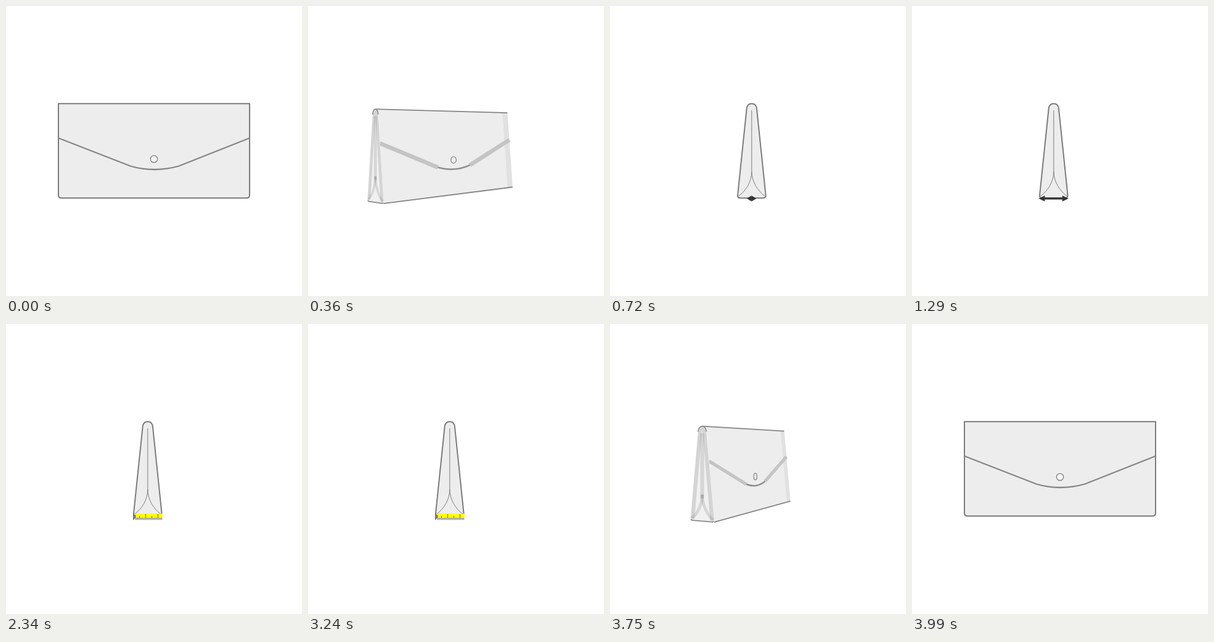
Recreate the animation shown at these times as an HTML page with a canvas. Size 480 by 470 pixels, loop 4080 ms.

```html
<!DOCTYPE html>
<html lang="en">
<head>
<meta charset="utf-8">
<title>Document wallet depth</title>
<style>
html, body { margin: 0; width: 100%; height: 100%; overflow: hidden; background: #fff; }
canvas { display: block; }
</style>
</head>
<body>
<canvas id="stage" width="480" height="470"></canvas>
<script>
const g = document.getElementById('stage').getContext('2d');
const LOOP = 4080, STEP = 30;
const FILL = '#ededed', LINE = '#7b7b7b', PALE = '#d4d4d4';

const clamp = x => Math.max(0, Math.min(1, x));
const span = (t, from, to) => clamp((t - from) / (to - from));
const easeOut = p => 1 - (1 - p) ** 2;

function stroke(path, color, width) {
  g.strokeStyle = color;
  g.lineWidth = width;
  g.stroke(path);
}

function paint(path, width) {
  g.fillStyle = FILL;
  g.fill(path);
  stroke(path, LINE, width);
}

function poly(points, closed) {
  const path = new Path2D();
  points.forEach(p => path.lineTo(p[0], p[1]));
  if (closed) path.closePath();
  return path;
}

function inside(shape, draw) {
  g.save();
  g.clip(shape);
  draw();
  g.restore();
}

const front = new Path2D('M85 158.3H395V306Q395 311.3 390 311.3H90Q85 311.3 85 306Z');
const flap = new Path2D('M85 214L202 259.5Q240 270.5 280 259.5L395 214');
const side = new Path2D('M207 307L221.6 167C222 161.500 225 158.300 229.800 158.300' +
  'S237.600 161.500 238 167L252.500 306Q253 311.300 248.500 311.300H211Q206.500 311.300 207 307Z');
const folds = new Path2D('M229.800 169V268C229.800 285 220 300 208.500 308M229.800 268C229.800 285 240 300 251 308');

function drawFront() {
  paint(front, 2);
  stroke(flap, '#858585', 2.3);
  const button = new Path2D();
  button.arc(240, 248, 5.7, 0, 7);
  g.fillStyle = '#f3f3f3';
  g.fill(button);
  stroke(button, LINE, 1.2);
}

function drawSide() {
  paint(side, 2);
  stroke(folds, LINE, 1);
}

// u runs along the width, v down the height, w through the depth
function projector(angle, lift) {
  const a = angle * Math.PI / 180, c = Math.cos(a), s = Math.sin(a), bulge = Math.sin(2 * a);
  const near = 85 + 167.5 * (angle / 90) ** 1.9;
  const top = 158.3 + 8.5 * bulge, bottom = 311.3 + lift * bulge;
  const horizon = 196 + Math.max(0, angle - 62.7) * 1.54;
  return (u, v, w) => {
    const k = 740 / (740 + (u + (23 - w) * c) * s);
    return [
      240 + (near + u * c + (w - 23) * s - 240) * k,
      horizon + (top + (bottom - top) * v - horizon) * k
    ];
  };
}

function drawTurning(angle, lift) {
  const at = projector(angle, lift);
  const onFront = (u, v) => at(u, v, 8 + 15 * v);
  const onSide = (w, v) => at(0, v, w);
  const c = Math.cos(angle * Math.PI / 180), s = Math.sin(angle * Math.PI / 180);

  // front face
  const tl = onFront(0, 0), tr = onFront(310, 0), br = onFront(310, 1), bl = onFront(0, 1);
  const face = poly([tl, tr, br, bl], true);
  g.fillStyle = FILL;
  g.fill(face);
  inside(face, () => stroke(poly([tr, br]), '#e1e1e1', 4 + 16 * c));
  const ridge = onSide(0, 0);
  stroke(poly([ridge, tr]), '#858585', 1.8);
  stroke(poly([bl, br]), '#858585', 1.8);

  const a = onFront(0, .366), b = onFront(117, .664), m = onFront(155, .735);
  const d = onFront(195, .664), e = onFront(310, .366);
  stroke(poly([a, b]), '#c4c4c4', 3 + 5 * c);
  stroke(poly([d, e]), '#c4c4c4', 3 + 5 * c);
  const dip = new Path2D();
  dip.moveTo(...b);
  dip.quadraticCurveTo(...m, ...d);
  stroke(dip, '#bdbdbd', 3);
  stroke(dip, '#858585', 1.7);

  const button = new Path2D();
  button.ellipse(...onFront(155, .588), 5.7 * c, 5.4, 0, 0, 7);
  stroke(button, '#777', 1.1);

  // side face
  const cap = [];
  for (let i = 0; i <= 12; i++) {
    const r = Math.PI * i / 12;
    cap.push(onSide(-8 * Math.cos(r), .057 * (1 - Math.sin(r))));
  }
  const walls = [onSide(-23, .98), ...cap, onSide(23, .98)];
  const base = [onSide(22.5, .99), onSide(20, 1), onSide(-20, 1), onSide(-22.5, .99)];
  const shape = poly([...walls, ...base], true);
  g.fillStyle = '#f0f0f0';
  g.fill(shape);
  inside(shape, () => {
    stroke(poly(walls), PALE, 14 * s);
    stroke(poly([onSide(0, .075), onSide(0, .76)]), 'rgba(0,0,0,.11)', 7 * s);
    for (const dir of [-1, 1]) {
      const arc = new Path2D();
      arc.moveTo(...onSide(0, .72));
      arc.bezierCurveTo(...onSide(0, .83), ...onSide(10 * dir, .93), ...onSide(21 * dir, .98));
      stroke(arc, 'rgba(0,0,0,.11)', 5.5 * s);
    }
  });
  stroke(poly(cap), '#8a8a8a', 1.6);
  stroke(poly(base), '#8a8a8a', 1.8);
}

function drawArrow(p) {
  const half = 24.2 * p, head = Math.min(10, half), x = 229.6, y = 312;
  if (half < 1) return;
  g.fillStyle = '#333';
  g.fillRect(x - half + head - 1, y - 1.6, 2 * (half - head) + 2, 3.2);
  for (const dir of [-1, 1]) {
    const tip = x + dir * half, back = tip - dir * head;
    g.fill(poly([[tip, y], [back, y - 4.7], [back, y + 4.7]], true));
  }
}

function drawTape(p) {
  const end = 207 + 46.5 * p;
  const view = new Path2D();
  view.rect(205, 306, end - 205, 13);
  inside(view, () => {
    g.fillStyle = '#fff';
    g.fillRect(207, 308, 47, 11);
    g.fillStyle = '#ff0';
    g.fillRect(208, 307.5, 46, 7);
    g.fillStyle = '#666';
    for (let i = 0; i < 22; i++) {
      const x = 210 + 2 * i;
      const top = i % 10 === 8 ? 308 : i % 5 === 3 ? 311 : 314;
      g.fillRect(x, top, 1, 317.5 - top);
    }
  });
  g.fillStyle = '#777';
  g.fillRect(206, 306, 1.8, 11.500);
  g.fill(poly([[207, 308], [210.5, 310], [210.5, 313.5], [207, 317]], true));
}

function draw(t) {
  g.clearRect(0, 0, 480, 470);
  g.lineJoin = 'round';
  const back = t >= 3700;
  const angle = back ? 90 * (1 - span(t, 3702, 3990)) ** 2 : 90 * easeOut(span(t, 270, 615));
  if (angle < .01) return drawFront();
  if (angle < 89.9) return drawTurning(angle, back ? 12 : 9);
  drawSide();
  if (t < 2340) drawArrow(easeOut(span(t, 600, 1290)));
  if (t >= 1680 && t < 3690) {
    drawTape(t < 3240 ? easeOut(span(t, 1650, 2340)) : 1 - span(t, 3240, 3690) ** 2);
  }
}

const start = performance.now();
function tick() {
  const t = (performance.now() - start) % LOOP;
  draw(Math.floor(t / STEP) * STEP);
  requestAnimationFrame(tick);
}
tick();
</script>
</body>
</html>
```
